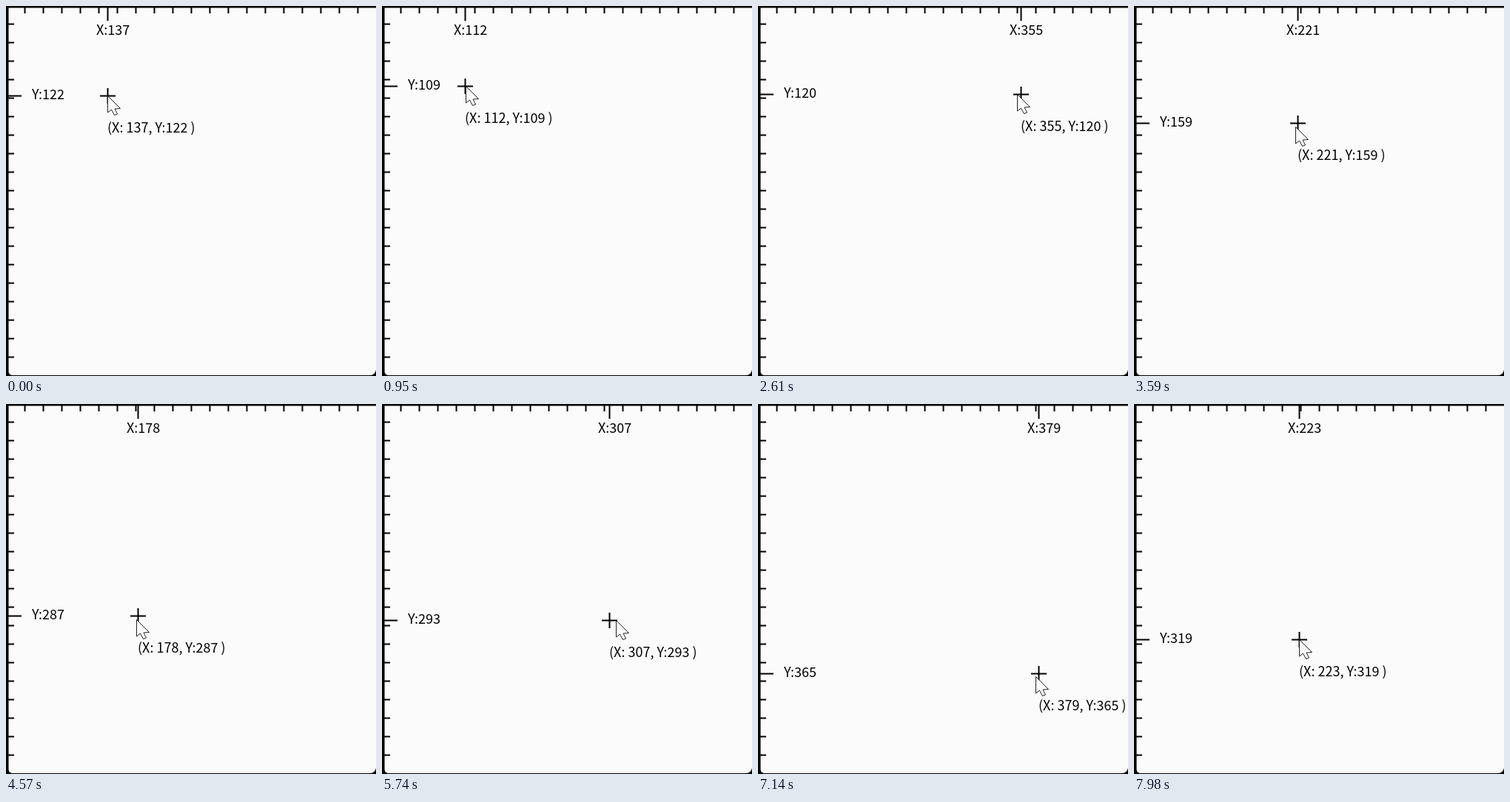
Recreate the animation shown at these times as an HTML page with a canvas. Size 500 px wide and 500 px high, loop 8.11 s.

```html
<!DOCTYPE html>
<html lang="en">
<head>
<meta charset="utf-8">
<title>Mouse coordinates</title>
<style>
html, body { margin: 0; width: 100%; height: 100%; overflow: hidden; background: #fbfbfb; }
canvas { display: block; }
</style>
</head>
<body>
<canvas id="stage" width="500" height="500"></canvas>
<script>
const ctx = document.getElementById('stage').getContext('2d');
const SIZE = 500, SPACING = 25;
const LOOP = 8110, STEP = 70;
const LAG = 50; // ms by which the cross trails the pointer

// Four strokes of the hand with rests between them; key points are {t, x, y}
const key = (t, x, y) => ({ t, x, y });
const strokes = [
  [key(0, 137, 122), key(340, 110, 108)],
  [key(600, 110, 108), key(950, 112, 109), key(1220, 176, 135), key(1440, 267, 117), key(2070, 388, 119)],
  [key(2260, 388, 119), key(2610, 355, 120), key(3100, 294, 119), key(3590, 221, 159),
    key(3940, 207, 210), key(4990, 168, 311)],
  [key(5180, 168, 311), key(5740, 307, 293), key(6440, 410, 298), key(7140, 379, 365),
    key(7420, 318, 382), key(7980, 223, 319)]
];

const slope = (a, b, axis) => (b[axis] - a[axis]) / (b.t - a.t);

// Monotone tangent: flat at turning points and at both ends of a stroke
function tangent(stroke, i, axis) {
  if (i === 0 || i === stroke.length - 1) return 0;
  const before = slope(stroke[i - 1], stroke[i], axis);
  const after = slope(stroke[i], stroke[i + 1], axis);
  return before * after <= 0 ? 0 : 2 * before * after / (before + after);
}

function along(stroke, time, axis) {
  const t = Math.max(stroke[0].t, Math.min(time, stroke.at(-1).t));
  const next = Math.max(1, stroke.findIndex(k => k.t >= t));
  const a = stroke[next - 1], b = stroke[next];
  const span = b.t - a.t, u = (t - a.t) / span, v = 1 - u;
  return v * v * (1 + 2 * u) * a[axis] + u * u * (1 + 2 * v) * b[axis] +
    u * v * span * (v * tangent(stroke, next - 1, axis) - u * tangent(stroke, next, axis));
}

function lead(stroke, time, axis) {
  const h = 5;
  return LAG * (along(stroke, time + h, axis) - along(stroke, time - h, axis)) / (2 * h);
}

// Lines sit half a pixel off the grid, which softens their edges
const vertical = (x, y, length) => ctx.fillRect(x - 0.5, y, 2, length);
const horizontal = (x, y, length) => ctx.fillRect(x, y - 1.5, length, 2);

function drawWindow() {
  ctx.fillStyle = '#000';
  ctx.fillRect(0, 0, SIZE, SIZE);
  ctx.fillStyle = '#fbfbfb';
  ctx.beginPath();
  ctx.roundRect(3.5, 2.5, SIZE - 3.5, SIZE - 3.5, [0, 0, 8, 5]);
  ctx.fill();
  ctx.fillStyle = '#000';
  for (let p = SPACING; p < SIZE; p += SPACING) {
    vertical(p, 0, 10);
    horizontal(0, p, 11);
  }
}

function drawReadout(x, y) {
  vertical(x, 0, 20);
  horizontal(0, y, 21);
  vertical(x, y - 11, 21);
  horizontal(x - 10, y, 21);
  ctx.font = '18px "Noto Sans CJK JP", "Noto Sans CJK SC", "Noto Sans CJK", "Noto Sans", sans-serif';
  ctx.fillText(`X:${x}`, x - 15, 39);
  ctx.fillText(`Y:${y}`, 35, y + 4);
  ctx.fillText(`(X: ${x}, Y:${y} )`, x, y + 49);
}

function drawPointer(x, y) {
  const outline = [[0, 0], [0, 22.5], [5, 18.5], [9, 26], [13, 24.5], [9.5, 17.5], [17, 17]];
  ctx.beginPath();
  for (const [dx, dy] of outline) ctx.lineTo(x + 0.5 + dx, y - 0.5 + dy);
  ctx.closePath();
  ctx.fillStyle = '#fff';
  ctx.fill();
  ctx.strokeStyle = '#222';
  ctx.lineWidth = 1;
  ctx.stroke();
}

function draw(now) {
  const time = now % LOOP;
  const stroke = strokes.findLast(s => s[0].t <= time);
  const start = stroke[0].t, end = stroke.at(-1).t;
  const t = time >= end ? end : start + Math.floor((time - start) / STEP) * STEP;
  const [x, y] = ['x', 'y'].map(axis => Math.round(along(stroke, t, axis)));
  const [dx, dy] = ['x', 'y'].map(axis => Math.round(lead(stroke, t, axis)));
  drawWindow();
  drawReadout(x, y);
  drawPointer(x + dx, y + dy);
}

const begin = performance.now();
function tick() {
  draw(performance.now() - begin);
  requestAnimationFrame(tick);
}
tick();
</script>
</body>
</html>
```
